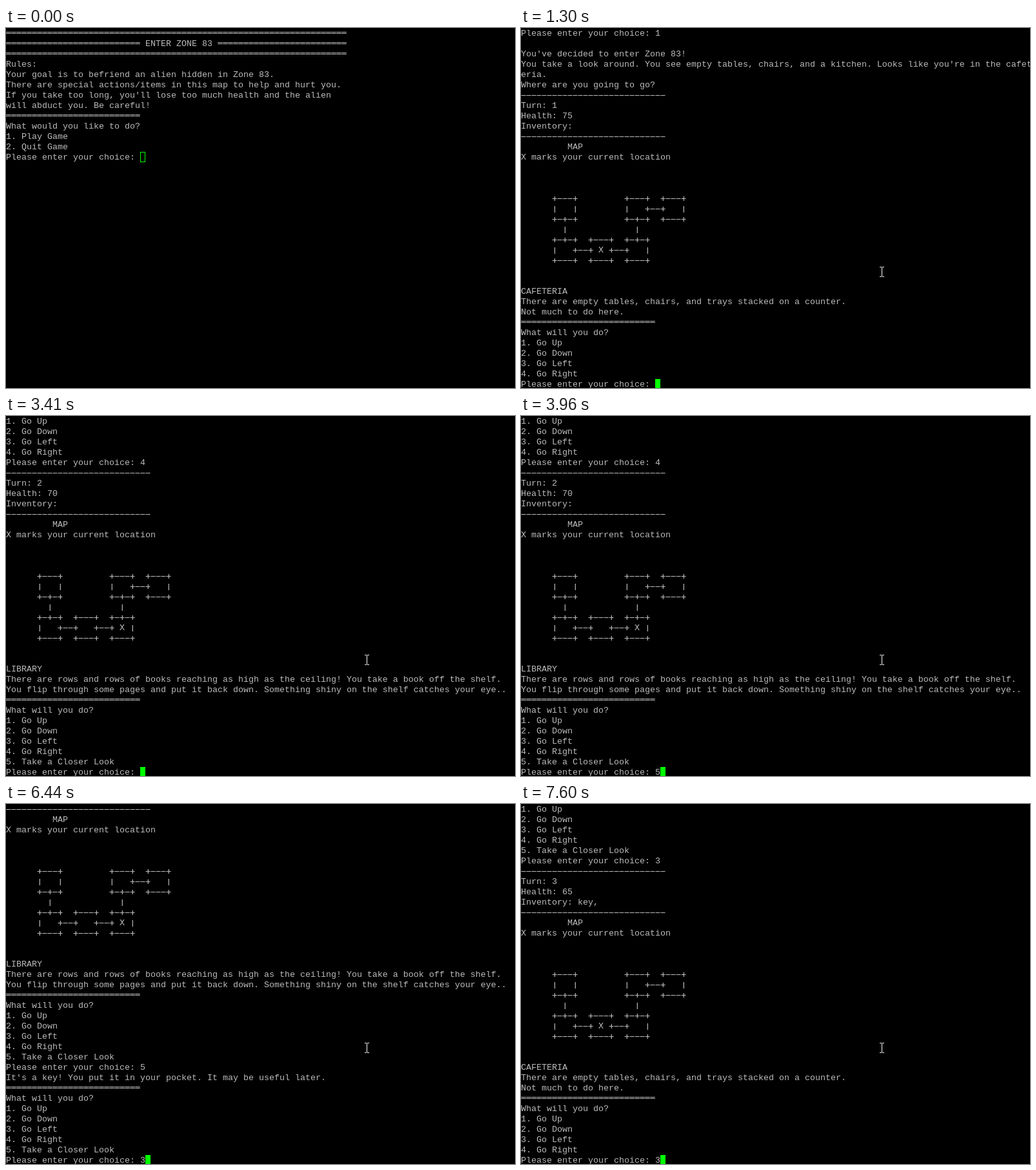
Animation of 789x558 px, one loop 8 s. Source, as an HTML page with a canvas:

```html
<!DOCTYPE html>
<html lang="en">
<head>
<meta charset="utf-8">
<title>Terminal adventure</title>
<style>
  html, body { margin: 0; width: 100%; height: 100%; overflow: hidden; background: #000; }
  canvas { display: block; }
</style>
</head>
<body>
<canvas id="stage" width="789" height="558"></canvas>
<script>
const ctx = document.getElementById('stage').getContext('2d', { alpha: false });
const LOOP = 8000, CELL_W = 8, CELL_H = 16, ROWS = 35;
const GREY = '#bbbbbb', GREEN = '#00ff00';
const PROMPT = 'Please enter your choice: ';
const DOUBLE = '='.repeat(26), SINGLE = '-'.repeat(28);

const menu = (...extra) => [
  DOUBLE, 'What will you do?',
  ...['Go Up', 'Go Down', 'Go Left', 'Go Right', ...extra].map((s, i) => `${i + 1}. ${s}`),
  PROMPT
];

const map = inLibrary => [
  '      +---+         +---+  +---+',
  '      |   |         |   +--+   |',
  '      +-+-+         +-+-+  +---+',
  '        |             |',
  '      +-+-+  +---+  +-+-+',
  `      |   +--+ ${inLibrary ? ' ' : 'X'} +--+ ${inLibrary ? 'X' : ' '} |`,
  '      +---+  +---+  +---+'
];

const status = (turn, health, items, inLibrary) => [
  SINGLE, `Turn: ${turn}`, `Health: ${health}`, `Inventory: ${items}`, SINGLE,
  '         MAP', 'X marks your current location', '', '', '',
  ...map(inLibrary), '', ''
];

const cafeteria = [
  'CAFETERIA',
  'There are empty tables, chairs, and trays stacked on a counter.',
  'Not much to do here.',
  ...menu()
];

const library = [
  'LIBRARY',
  'There are rows and rows of books reaching as high as the ceiling! You take a book off the shelf.',
  'You flip through some pages and put it back down. Something shiny on the shelf catches your eye..',
  ...menu('Take a Closer Look')
];

const intro = [
  '='.repeat(66),
  DOUBLE + ' ENTER ZONE 83 ' + '='.repeat(25),
  '='.repeat(66),
  'Rules:',
  'Your goal is to befriend an alien hidden in Zone 83.',
  'There are special actions/items in this map to help and hurt you.',
  "If you take too long, you'll lose too much health and the alien",
  'will abduct you. Be careful!',
  DOUBLE,
  'What would you like to do?', '1. Play Game', '2. Quit Game',
  PROMPT
];

const arrival = [
  '',
  "You've decided to enter Zone 83!",
  "You take a look around. You see empty tables, chairs, and a kitchen. Looks like you're in the cafet",
  'eria.',
  'Where are you going to go?'
];

// Each step prints its lines at `at`, then the key is typed at `typed`.
const steps = [
  { at: 0, typed: 930, key: '1', lines: intro },
  { at: 1300, typed: 2870, key: '4', lines: [...arrival, ...status(1, 75, '', false), ...cafeteria] },
  { at: 3410, typed: 3960, key: '5', lines: [...status(2, 70, '', true), ...library] },
  { at: 4890, typed: 6440, key: '3', lines: [
    "It's a key! You put it in your pocket. It may be useful later.",
    ...menu('Take a Closer Look')] },
  { at: 6820, typed: 7600, key: '3', lines: [...status(3, 65, 'key, ', false), ...cafeteria] }
];

function transcript(t) {
  const out = [];
  for (const s of steps) {
    if (t < s.at) break;
    out.push(...s.lines);
    if (t >= s.typed) out[out.length - 1] += s.key;
  }
  return out.slice(-ROWS);
}

// Line-drawing characters as rules: x, y, width, height in the cell.
// Fractional edges give the soft sides of smoothed type.
const rules = {
  '=': [[0.25, 6, 7.5, 1], [0.25, 8, 7.5, 1]],
  '-': [[0.5, 8, 7, 1]],
  '+': [[0.5, 8, 7, 1], [3.7, 5, 1.2, 7]],
  '|': [[3.7, 4, 1.2, 10]]
};

function drawLine(line, row) {
  const y = row * CELL_H;
  ctx.fillStyle = GREY;
  [...line].forEach((ch, col) => {
    for (const [dx, dy, w, h] of rules[ch] || []) {
      ctx.fillRect(col * CELL_W + dx, y + dy, w, h);
    }
  });
  ctx.fillText(line.replace(/[=+|-]/g, ' '), 0, y + 12);
}

function drawCaret(col, row, focused) {
  const x = col * CELL_W, y = row * CELL_H;
  ctx.fillStyle = GREEN;
  ctx.fillRect(x, y, CELL_W, CELL_H);
  if (!focused) {
    ctx.fillStyle = '#000';
    ctx.fillRect(x + 1, y + 1, CELL_W - 2, CELL_H - 2);
  }
}

function drawPointer(t) {
  const step = Math.min(6, Math.floor((t - 70) / 78));
  const left = (1 - step / 6) ** 2;
  const x = Math.round(559 + 54 * left), y = Math.round(378 + 145 * left);
  ctx.fillStyle = '#fff';
  for (const edge of [y - 8, y + 7]) {
    ctx.fillRect(x - 3, edge, 3, 1);
    ctx.fillRect(x + 1, edge, 3, 1);
  }
  ctx.fillRect(x, y - 7, 1, 14);
}

function draw(t) {
  ctx.fillStyle = '#000';
  ctx.fillRect(0, 0, 789, 558);
  ctx.font = '13.333px "Liberation Mono", "Courier New", monospace';
  const lines = transcript(t);
  lines.forEach(drawLine);
  const last = lines.length - 1;
  drawCaret(lines[last].length, last, t >= 70);
  if (t >= 70) drawPointer(t);
}

const start = performance.now();
function tick() {
  draw((performance.now() - start) % LOOP);
  requestAnimationFrame(tick);
}
tick();
</script>
</body>
</html>
```
